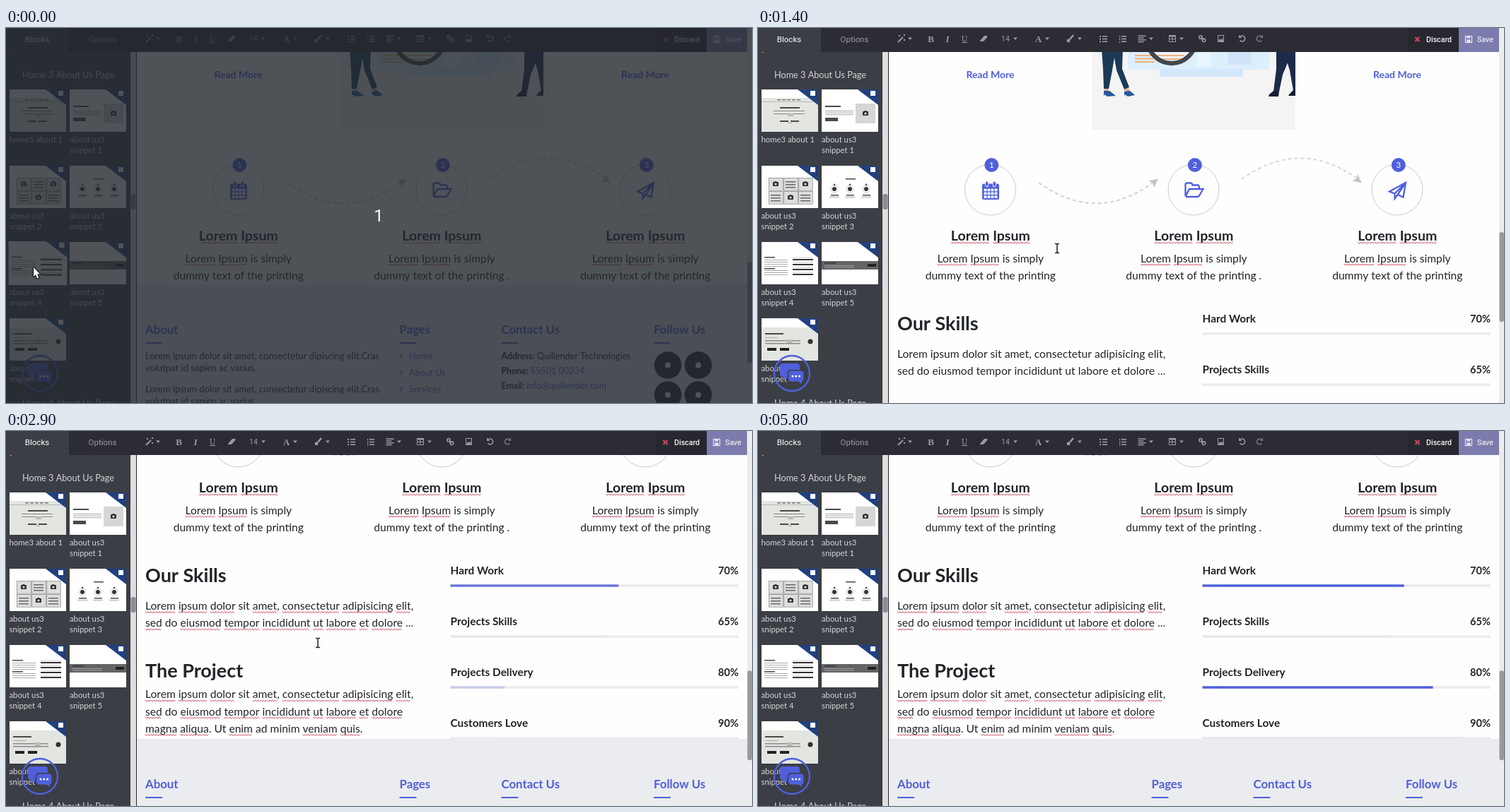
Recreate the animation shown at these times as an HTML page with a canvas. Size 1055x531 px, loop 6100 ms.

```html
<!DOCTYPE html>
<html lang="en">
<head>
<meta charset="utf-8">
<title>Page builder</title>
<style>
html, body { margin: 0; width: 100%; height: 100%; overflow: hidden; background: #fff; }
canvas { display: block; }
</style>
</head>
<body>
<canvas id="stage" width="1055" height="531"></canvas>
<script>
const ctx = document.getElementById('stage').getContext('2d');
const LOOP = 6100, STEP = 100, DRAG = 800, DROP = 1400, HIDE = 4300;
const BLUE = '#4f60dc', INK = '#212529', PANEL = '#3c3e45', ICON = '#9b9da3', PALE = '#d3d4d7';
const INSERTED = 287;

const font = (size, weight = 400, family = 'Lato') => `${weight} ${size}px ${family}, sans-serif`;
const BODY = font(15.65), SMALL = font(13), LABEL = font(11.3);
const clamp = v => Math.max(0, Math.min(1, v));

function text(str, x, y, f, color, align = 'left') {
  ctx.font = f;
  ctx.fillStyle = color;
  ctx.textAlign = align;
  ctx.fillText(str, x, y);
}
function rect(x, y, w, h, color) {
  ctx.fillStyle = color;
  ctx.fillRect(x, y, w, h);
}
function round(x, y, w, h, r, color) {
  ctx.fillStyle = color;
  ctx.beginPath();
  ctx.roundRect(x, y, w, h, r);
  ctx.fill();
}
function disc(x, y, r, color) {
  ctx.fillStyle = color;
  ctx.beginPath();
  ctx.arc(x, y, r, 0, 7);
  ctx.fill();
}
function ring(x, y, r, color, w = 1) {
  ctx.strokeStyle = color;
  ctx.lineWidth = w;
  ctx.beginPath();
  ctx.arc(x, y, r, 0, 7);
  ctx.stroke();
}
function box(x, y, w, h, color, lw = 1) {
  ctx.strokeStyle = color;
  ctx.lineWidth = lw;
  ctx.strokeRect(x, y, w, h);
}
function trace(pts) {
  ctx.beginPath();
  for (let i = 0; i < pts.length; i += 2) ctx.lineTo(pts[i], pts[i + 1]);
}
function poly(color, ...pts) {
  trace(pts);
  ctx.fillStyle = color;
  ctx.fill();
}
function line(color, w, ...pts) {
  trace(pts);
  ctx.strokeStyle = color;
  ctx.lineWidth = w;
  ctx.stroke();
}
function curve(color, w, path) {
  ctx.strokeStyle = color;
  ctx.lineWidth = w;
  ctx.stroke(new Path2D(path));
}

// Spell-check waves under the words a dictionary would reject
const KNOWN = new Set(['is', 'simply', 'sit', 'do', 'ad', 'minim', 'Ut']);
function waves(str, x, y, f, centred) {
  ctx.font = f;
  if (centred) x -= ctx.measureText(str).width / 2;
  for (const m of str.matchAll(/\w+/g)) {
    if (KNOWN.has(m[0])) continue;
    const a = x + ctx.measureText(str.slice(0, m.index)).width;
    const b = a + ctx.measureText(m[0]).width;
    const pts = [];
    for (let i = 0; a + i * 2 <= b; i++) pts.push(a + i * 2, y + (i % 2 ? 1 : -0.6));
    line('#cc2f45', 0.9, ...pts);
  }
}

// CSS "ease"
function ease(x) {
  x = clamp(x);
  let lo = 0, hi = 1;
  const bez = (u, p, q) => 3 * (1 - u) ** 2 * u * p + 3 * (1 - u) * u * u * q + u ** 3;
  for (let i = 0; i < 20; i++) {
    const mid = (lo + hi) / 2;
    if (bez(mid, 0.25, 0.25) < x) lo = mid; else hi = mid;
  }
  return bez(lo, 0.1, 1);
}

const scrollAt = t => 107 * (1 - Math.cos(Math.PI * clamp((t - 1437) / 940)));

const PATH = [[700, 39, 347], [800, 72, 350], [1100, 386, 363], [1300, 420, 342], [1400, 423, 312],
  [1700, 423, 309], [2100, 424, 306], [2700, 431, 300], [2900, 441, 300], [3500, 455, 300], [3700, 456, 300]];
function pointer(t) {
  const i = PATH.findIndex(k => k[0] > t);
  if (i === 0) return PATH[0].slice(1);
  if (i < 0) return PATH.at(-1).slice(1);
  const [ta, xa, ya] = PATH[i - 1], [tb, xb, yb] = PATH[i];
  const k = (t - ta) / (tb - ta);
  return [xa + (xb - xa) * k, ya + (yb - ya) * k];
}

// ---- Sidebar thumbnails, each 80 by 60 ----
const DARK = '#4a4a4a', GREY = '#a8a8a8', PLATE = '#e3e5e1';
function camera(x, y) {
  round(x - 4, y - 3, 8, 6, 1, '#333');
  rect(x - 1.5, y - 4, 3, 1, '#333');
  disc(x, y, 1.6, '#ddd');
}
function rows(x, y, w, n, gap, color = GREY, h = 1) {
  for (let i = 0; i < n; i++) rect(x, y + i * gap, w, h, color);
}
const THUMBS = [
  () => {
    rect(0, 12, 80, 48, PLATE);
    for (let i = 0; i < 5; i++) rect(22 + i * 7, 14, 5, 1.5, '#777');
    rect(0, 17, 80, 1, '#b9bbb7');
    rect(26, 25, 28, 2, DARK);
    rows(17, 30, 44, 2, 4, '#888');
    rect(37, 34, 8, 4, '#bbb');
    rect(26, 44, 12, 2, DARK);
    rect(41, 44, 12, 2, DARK);
    rect(37, 47, 6, 1, GREY);
  },
  () => {
    rect(5, 23, 22, 2, DARK);
    rows(5, 30, 40, 3, 2.6);
    rect(5, 40, 18, 5, DARK);
    rect(48, 20, 28, 28, '#d6d6d6');
    camera(62, 34);
  },
  () => {
    for (let i = 0; i < 6; i++) {
      const x = 10 + i % 3 * 21, y = 17 + (i > 2) * 19;
      rect(x, y, 20.5, 18.5, '#777');
      rect(x + 0.6, y + 0.6, 19.3, 17.3, '#dcdedb');
      if (i % 2 || i === 0 || i === 2) { /* cells alternate lines and pictures */ }
      if ([0, 2, 4].includes(i)) camera(x + 10, y + 9);
      else rows(x + 3, y + 5, 14, 3, 4, '#666', 1.5);
    }
  },
  () => {
    rect(34, 18, 14, 1.5, DARK);
    for (const x of [18, 40, 63]) {
      disc(x, 27, 1.5, DARK);
      ring(x, 33, 5, '#ccc');
      disc(x, 33, 3, '#333');
      rect(x - 5, 41, 11, 1.5, DARK);
      rect(x - 7, 44, 14, 1, GREY);
    }
  },
  () => {
    rect(4, 21, 15, 1.5, DARK);
    rows(4, 25, 33, 4, 3);
    rect(4, 37, 15, 1.5, DARK);
    rows(4, 40, 33, 3, 3);
    rows(44, 24, 29, 4, 7, '#333', 2);
    rows(44, 21.5, 29, 4, 7, '#ccc');
  },
  () => {
    rect(0, 27, 80, 12, '#646464');
    rect(4, 29, 16, 1.5, '#333');
    rows(4, 33, 42, 2, 2.5, '#a0a0a0');
    rect(65, 31, 12, 4, '#222');
  },
  () => {
    rect(0, 13, 80, 47, PLATE);
    rect(5, 21, 26, 2, DARK);
    rect(5, 27, 18, 1, GREY);
    rows(5, 31, 50, 2, 4, '#8c8c8c', 1.5);
    rect(36, 30, 8, 5, '#bbb');
    disc(69, 33, 3.5, '#333');
    rect(8, 42, 13, 4, '#222');
    rect(26, 42, 13, 4, '#222');
  }
];
function thumb(i, x, y, k = 1) {
  ctx.save();
  ctx.translate(x + 40, y + 30);
  ctx.scale(k, k);
  ctx.translate(-40, -30);
  ctx.beginPath();
  ctx.rect(0, 0, 80, 60);
  ctx.clip();
  rect(0, 0, 80, 60, '#fff');
  THUMBS[i]();
  poly('#20407f', 51, 0, 80, 0, 80, 22);
  rect(69, 2, 7, 7, '#fff');
  ctx.restore();
}

function sidebar(t) {
  rect(0, 34, 184, 497, PANEL);
  rect(5, 34, 3, 1, '#d98a3a');
  text('Home 3 About Us Page', 88, 71, font(12.7), PALE, 'center');
  for (let i = 0; i < 7; i++) {
    const x = i % 2 ? 90 : 5, row = i >> 1, y = 87 + row * 108;
    thumb(i, x, y, i === 4 && t < DRAG ? 1.04 : 1);
    const tx = x === 5 ? 4.5 : x;
    text(i ? 'about us3' : 'home3 about 1', tx, y + 75, LABEL, PALE);
    if (i) text('snippet ' + i, tx, y + 89.5, LABEL, PALE);
  }
  text('Home 4 About Us Page', 88, 536, font(12.7), PALE, 'center');

  ring(48, 489, 25, BLUE, 2.4);
  round(31, 475, 28, 19, 4, BLUE);
  poly(BLUE, 36, 492, 42, 493, 35, 500);
  round(41.5, 484, 24, 18, 5, PANEL);
  round(43, 485.5, 21.5, 15, 4, BLUE);
  poly(BLUE, 56, 500, 62, 499, 62, 504);
  for (let i = 0; i < 3; i++) disc(49 + i * 4.8, 493, 1.5, '#fff');

  rect(176, 34, 8, 497, '#dedfe0');
  round(176.5, 235, 7, 22, 3, '#8b8d90');
  rect(184, 34, 1, 497, '#26272c');
}

// ---- Toolbar ----
function toolbar() {
  rect(0, 0, 1048, 34, '#2b2c34');
  rect(0, 0, 89, 34, PANEL);
  const tab = font(11.5, 400, 'Roboto');
  text('Blocks', 44, 19.5, tab, '#fff', 'center');
  text('Options', 136.5, 19.5, tab, ICON, 'center');
  for (const x of [215, 364, 409, 455, 556, 599]) poly(ICON, x - 3, 13.5, x + 3, 13.5, x, 17);

  line(ICON, 2, 198, 20, 205, 13);
  for (const [x, y] of [[200, 11], [207, 10], [207, 17]]) rect(x - 1, y - 1, 2, 2, ICON);
  text('B', 244.5, 19.5, font(13, 700, 'Liberation Serif'), ICON, 'center');
  text('I', 268, 19.5, font(13, 'italic 700', 'Liberation Serif'), ICON, 'center');
  text('U', 292, 18.5, font(12, 400, 'Liberation Serif'), ICON, 'center');
  rect(288, 20, 8, 1, ICON);
  poly(ICON, 314, 18, 320, 11, 325, 11, 319, 18);
  line(ICON, 1, 314, 18.5, 319, 18.5, 324, 13);
  text('14', 350, 19, font(10.5, 400, 'Roboto'), ICON, 'center');
  text('A', 396.5, 19.5, font(13, 700, 'Liberation Serif'), ICON, 'center');
  line(ICON, 2.5, 441, 16, 446, 10);
  disc(439, 18, 2.4, ICON);
  for (let i = 0; i < 3; i++) {
    const y = 11 + i * 3.7;
    rect(483, y, 2, 2, ICON);
    rect(487, y, 7, 1.6, ICON);
    rect(511, y, 1.2, 2.4, ICON);
    rect(514, y, 7, 1.6, ICON);
  }
  for (let i = 0; i < 4; i++) rect(537.5, 10.5 + i * 2.8, i % 2 ? 8 : 11, 1.5, ICON);
  box(581.5, 10.5, 9, 9, ICON);
  rect(581, 10, 10, 2.5, ICON);
  line(ICON, 1, 586, 11, 586, 19);
  line(ICON, 1, 582, 15.5, 591, 15.5);
  ring(626, 13, 2.3, ICON, 1.5);
  ring(630.5, 17.3, 2.3, ICON, 1.5);
  line(ICON, 1.5, 626.5, 13.5, 630, 17);
  box(650.5, 10.5, 8, 9, ICON);
  poly(ICON, 651, 19, 653, 15, 655, 17, 657, 14, 658, 19);
  curve(ICON, 1.6, 'M682 12 A4 4 0 1 1 681.5 17.5');
  poly(ICON, 680, 9.5, 680, 14, 684.5, 14);
  curve('#75777d', 1.6, 'M712 12 A4 4 0 1 0 712.5 17.5');
  poly('#75777d', 714, 9.5, 714, 14, 709.5, 14);

  const action = font(10.6, 500, 'Roboto');
  rect(919, 0, 72, 34, '#27282f');
  line('#d0475a', 2.2, 929.5, 13, 935.5, 19);
  line('#d0475a', 2.2, 935.5, 13, 929.5, 19);
  text('Discard', 945, 19.5, action, '#f2f2f2');
  rect(991, 0, 57, 34, '#7c7bad');
  box(1000.5, 11.5, 9, 9, '#e6e6f0', 1.2);
  rect(1002.5, 12, 4.5, 2.5, '#e6e6f0');
  rect(1002.5, 16.5, 5, 3.5, '#e6e6f0');
  text('Save', 1017, 19.5, action, '#e6e6f0');
}

// ---- Page sections ----
function illustration() {
  ctx.save();
  ctx.beginPath();
  ctx.rect(472, 0, 288, 144);
  ctx.clip();
  rect(472, 0, 288, 144, '#f4f4f4');
  round(523, 0, 200, 59, 3, '#ddeefd');
  rect(568, 58, 118, 11, '#d3e8fb');
  rect(620, 34, 20, 20, '#e9f5ff');
  rect(665, 34, 32, 18, '#cfe4f8');
  rows(533, 38, 28, 3, 4.5, '#eeb17c', 2);
  disc(585, 16, 33, '#eef5fb');
  rows(565, 38, 38, 2, 5, '#eeb17c', 2);
  ring(585, 16, 34, '#43474d', 6.5);
  poly('#1d3a55', 486, 30, 506, 30, 501, 60, 496, 86, 489, 86, 488, 58);
  poly('#1d3a55', 502, 30, 516, 30, 515, 58, 525, 84, 518, 87, 507, 60);
  poly('#e8ab92', 490, 86, 495, 86, 496, 91, 490, 91);
  poly('#e8ab92', 518, 87, 524, 85, 526, 90, 520, 91);
  poly('#24579d', 489, 89, 497, 89, 506, 96, 494, 97, 490, 94, 489, 97);
  poly('#24579d', 518, 90, 526, 89, 533, 95, 523, 97, 519, 94, 518, 97);
  poly('#1c2b49', 733, 20, 762, 20, 762, 40, 752, 42, 742, 66, 737, 90, 729, 90, 733, 58);
  poly('#1c2b49', 744, 34, 762, 34, 762, 89, 757, 89, 752, 60);
  poly('#151d33', 729, 89, 737, 89, 736, 97, 722, 97, 723, 94);
  poly('#151d33', 757, 88, 762, 88, 762, 96, 750, 96, 752, 93);
  ctx.restore();
}

function calendar(color, hole) {
  round(317, 220.5, 24, 22.5, 2.5, color);
  for (const x of [322, 332.5]) {
    round(x - 0.8, 217, 5, 8, 2, hole);
    round(x, 217.5, 3.4, 6.5, 1.5, color);
  }
  for (let i = 0; i < 12; i++) rect(319.6 + i % 4 * 5, 227.6 + (i >> 2) * 4.9, 3.8, 3.6, hole);
}
function folder() {
  curve(BLUE, 2.3, 'M604.5 238 V221.5 Q604.5 219.5 606.5 219.5 H612 Q614 219.5 614.5 222.5 H622 Q624 222.5 624 227' +
    ' M604.5 238.5 L610 228 H629.5 L624 237.5 Q623 239 621 239 H605');
}
function plane() {
  curve(BLUE, 2.3, 'M916 219 L912.5 239.5 L904.5 236 L900.5 241.5 V234.5 L893 231.5 Z M900.5 234.5 L916 219 M904.5 236 L916 219');
}

function steps(hover) {
  ctx.save();
  ctx.setLineDash([5, 4]);
  curve('#cfcfcf', 2, 'M397 219 Q478 277 557 220');
  curve('#d6d6d6', 2, 'M684 214 Q765 156 846 212');
  ctx.restore();
  poly('#c4c4c4', 566, 213.5, 552, 216.5, 558, 219.5, 560, 226);
  poly('#c4c4c4', 854, 219.5, 840, 216.5, 846, 213.5, 848, 207);

  [328.5, 616, 904].forEach((x, i) => {
    ring(x, 229, 36, '#cacaca');
    if (i === 0) {
      calendar(BLUE, '#fff');
      if (hover > 0) {
        ctx.globalAlpha = hover;
        disc(x, 229, 35.5, BLUE);
        calendar('#fff', BLUE);
        ctx.globalAlpha = 1;
      }
    } else if (i === 1) folder();
    else plane();
    disc(x + 1.8, 194, 10, BLUE);
    text(i + 1, x + 1.8, 198, font(11.5), '#fff', 'center');

    const head = font(19.5, 700), intro = 'Lorem Ipsum is simply';
    waves('Lorem Ipsum', x + 0.3, 304, head, true);
    text('Lorem Ipsum', x + 0.3, 301.2, head, INK, 'center');
    waves(intro, x + 0.3, 335, BODY, true);
    text(intro, x + 0.3, 331.5, BODY, INK, 'center');
    text('dummy text of the printing' + (i === 1 ? ' .' : ''), x + 0.3, 356, BODY, INK, 'center');
  });
}

const TINT = '#e6e8ee';
const BARS = [
  ['Hard Work', 70, 2100, BLUE], ['Projects Skills', 65, 2100, TINT],
  ['Projects Delivery', 80, 2640, BLUE], ['Customers Love', 90, 2680, TINT]
];
const COPY = [
  ['Lorem ipsum dolor sit amet, consectetur adipisicing elit,', 467],
  ['sed do eiusmod tempor incididunt ut labore et dolore ...', 491.3],
  ['Lorem ipsum dolor sit amet, consectetur adipisicing elit,', 592.3],
  ['sed do eiusmod tempor incididunt ut labore et dolore', 616.5],
  ['magna aliqua. Ut enim ad minim veniam quis.', 640.8]
];
function skills(t) {
  const head = font(27, 700);
  text('Our Skills', 197, 427.5, head, INK);
  text('The Project', 197, 562.5, head, INK);
  for (const [str, y] of COPY) {
    if (t >= 2400) waves(str, 197, y + 3.5, BODY);
    text(str, 197, y, BODY, INK);
  }
  BARS.forEach(([name, pct, start, color], i) => {
    const y = 431 + i * 72, done = ease((t - start) / 1500);
    text(name, 628.5, y - 14, font(15.4, 700), INK);
    text(pct + '%', 1036, y - 14, font(14.6, 700), INK, 'right');
    rect(628.5, y + 0.3, 407.5, 3.4, '#ebebeb');
    ctx.globalAlpha = done;
    rect(628.5, y + 0.3, 407.5 * pct / 100 * done, 3.4, color);
    ctx.globalAlpha = 1;
  });
}

function field(name, value, y, color) {
  text(name, 700.5, y, font(12.3, 700), INK);
  text(value, 703.5 + ctx.measureText(name).width, y, font(12.6), color);
}
function footer() {
  rect(185, 363, 863, 300, '#ebecef');
  for (const [name, x] of [['About', 197], ['Pages', 556.5], ['Contact Us', 700.5], ['Follow Us', 916]]) {
    text(name, x, 433, font(16.8, 700), BLUE);
    rect(x, 445, 24, 2, BLUE);
  }
  [469, 516].forEach(y => {
    text('Lorem ipsum dolor sit amet, consectetur dipiscing elit.Cras', 197, y, SMALL, INK);
    text('volutpat id sapien ac varius.', 197, y + 17, SMALL, INK);
  });
  ['Home', 'About Us', 'Services'].forEach((name, i) => {
    const y = 469 + i * 23.5;
    line(BLUE, 1.3, 557, y - 7.5, 560, y - 4.5, 557, y - 1.5);
    text(name, 570, y, font(12.5), BLUE);
  });
  field('Address:', 'Quillender Technologies', 469, INK);
  field('Phone:', '55501 00234', 490, BLUE);
  field('Email:', 'info@quillender.com', 511, BLUE);
  for (let i = 0; i < 4; i++) {
    const x = 936 + i % 2 * 43, y = 477.5 + (i >> 1) * 42;
    disc(x, y, 19.3, '#23272b');
    disc(x, y, 4, '#fff');
  }
}

function dropZone(y) {
  ctx.save();
  rect(185, y, 863, 24, 'rgba(105,110,170,.19)');
  ctx.setLineDash([4, 3]);
  box(185.5, y + 0.5, 862, 23, '#b4b6c4');
  ctx.restore();
}

function page(t) {
  const dropped = t >= DROP, s = scrollAt(t);
  // The first step stays lit while the pointer is inside its card
  const hover = t < DROP ? 0 : Math.min(clamp((t - DROP) / 150), clamp((1960 - t) / 200));
  ctx.save();
  ctx.beginPath();
  ctx.rect(185, 34, 863, 497);
  ctx.clip();
  rect(185, 34, 863, 497, '#fefefe');
  ctx.translate(0, -Math.round(s));
  illustration();
  for (const x of [328.5, 904]) text('Read More', x, 70.5, font(14, 700), BLUE, 'center');
  steps(hover);
  if (dropped) skills(t);
  ctx.translate(0, dropped ? INSERTED : 0);
  footer();
  ctx.restore();
  if (t >= DRAG && !dropped) {
    dropZone(132);
    dropZone(351);
  }
  rect(1048, 0, 7, 531, '#ececec');
  const top = dropped ? 289 + 0.235 * s : 331;
  round(1048.5, top, 6.5, dropped ? 127 : 144, 3, '#98999b');
}

function ghost(x, y) {
  rect(x, y, 80, 100, '#3d4046');
  rect(x, y, 80, 62, '#fff');
  thumb(4, x, y + 1);
  text('about us3', x + 4, y + 77, LABEL, PALE);
  text('snippet 4', x + 4, y + 92, LABEL, PALE);
}

function cursor(t, x, y) {
  ctx.save();
  ctx.translate(Math.round(x), Math.round(y));
  ctx.lineJoin = 'round';
  if (t < 500) {
    ctx.translate(0, -8);
    const arrow = [0, 0, 0, 13, 3, 10.3, 5, 15.5, 7.3, 14.5, 5.2, 9.5, 9, 9.3, 0, 0];
    line('#111', 2.2, ...arrow);
    poly('#fff', ...arrow);
  } else if (t < DROP) {
    const hand = 'M-5 0 Q-7 -3 -4 -2 L-4 -4 Q-2.5 -6 -1 -4.5 Q1 -6 2 -4.5 Q4 -5.5 5 -3.5 Q7 -4 7 -1.5 L6 3 V5 H-2.5 Z';
    ctx.fillStyle = '#fff';
    ctx.fill(new Path2D(hand));
    curve('#111', 1.3, hand);
  } else {
    const beam = 'M-3 -6.5 H-1 L0 -5.5 L1 -6.5 H3 M0 -5.5 V5.5 M-3 6.5 H-1 L0 5.5 L1 6.5 H3';
    curve('#fff', 3, beam);
    curve('#222', 1.5, beam);
  }
  ctx.restore();
}

function draw(t) {
  page(t);
  sidebar(t);
  toolbar();
  const [x, y] = pointer(t);
  if (t >= DRAG && t < DROP) ghost(x - 3, y - 2);
  if (t < 300) {
    rect(0, 0, 1055, 531, 'rgba(35,40,47,.8)');
    text('1', 527, 274, font(24, 400, 'Roboto'), '#fff', 'center');
  }
  if (t < HIDE) cursor(t, x, y);
}

const begin = performance.now();
function tick() {
  const t = (performance.now() - begin) % LOOP;
  draw(Math.floor(t / STEP) * STEP);
  requestAnimationFrame(tick);
}
tick();
</script>
</body>
</html>
```
